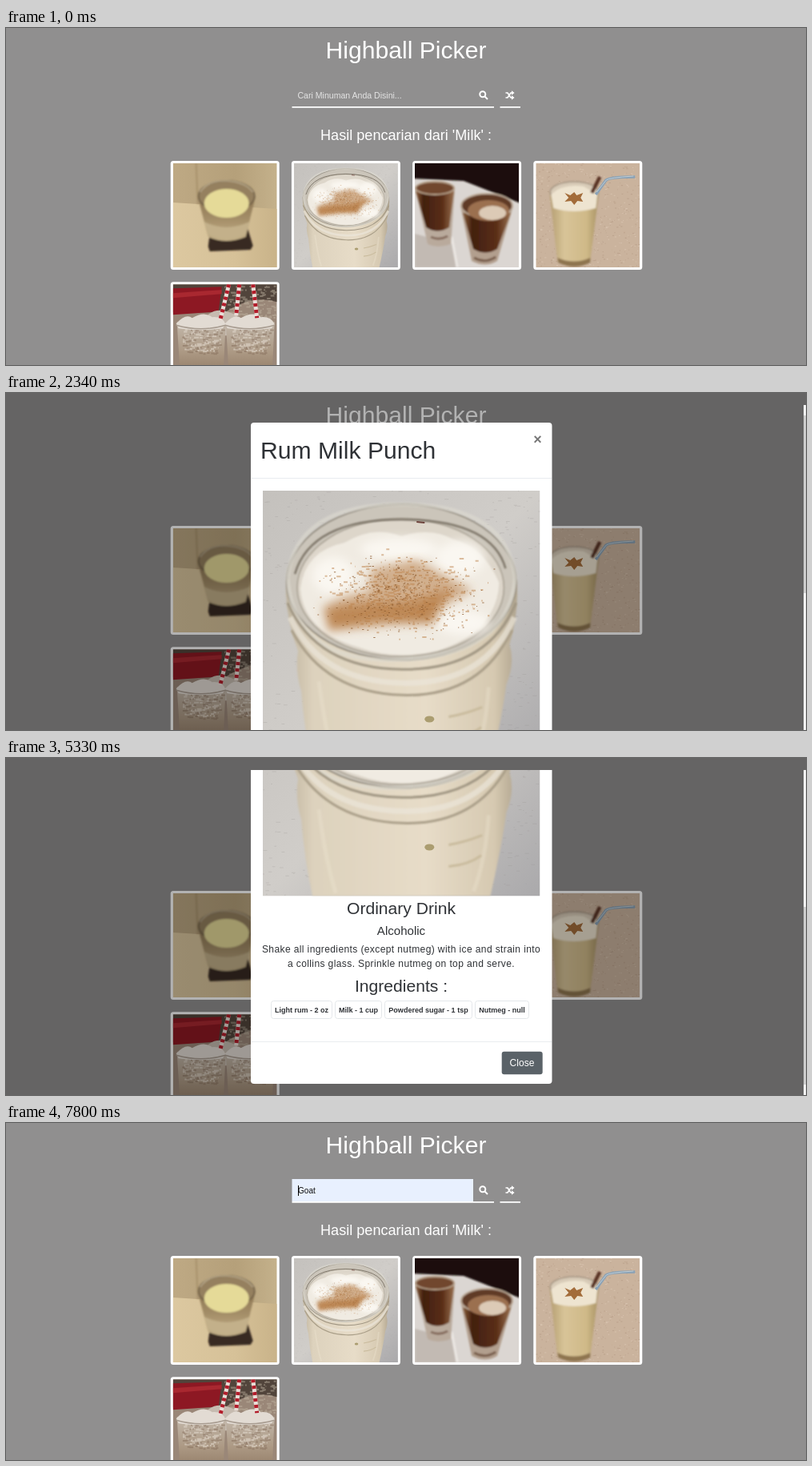
An HTML page for the animation above (8 s loop, 1000 px wide and 421 px high).

```html
<!DOCTYPE html>
<html lang="id">
<head>
<meta charset="utf-8">
<title>Highball Picker</title>
<style>
  html, body { margin: 0; width: 100%; height: 100%; overflow: hidden; background: #908f8f; }
  body > svg { display: block; width: 100%; height: 100%; }
  text { font-family: "Liberation Sans", Arial, sans-serif; fill: #2f3236; }
  .light { fill: #fff; }
  .mid { text-anchor: middle; }
  .h1 { font-size: 30.14px; }
  .h3 { font-size: 21.1px; }
  .h4 { font-size: 18.08px; }
  .h5 { font-size: 15.07px; }
  .body { font-size: 12.06px; }
  .spaced { letter-spacing: .377px; }
  .input { font-size: 10.55px; }
  .badge { font-size: 9.04px; font-weight: bold; }
</style>
</head>
<body>
<svg viewBox="0 0 1000 421">
  <defs>
    <linearGradient id="wall" x2="1"><stop stop-color="#bea984"/><stop offset=".6" stop-color="#b5a07a"/><stop offset="1" stop-color="#c4b18b"/></linearGradient>
    <linearGradient id="table" x2="1"><stop stop-color="#dcc8a0"/><stop offset=".6" stop-color="#d6c198"/><stop offset="1" stop-color="#c9b389"/></linearGradient>
    <linearGradient id="tumbler" x2="0" y2="1"><stop stop-color="#8c7552"/><stop offset=".5" stop-color="#a48e68"/><stop offset="1" stop-color="#c5b28a"/></linearGradient>
    <linearGradient id="cloth" x2="1" y2="1"><stop stop-color="#c4c1bd"/><stop offset=".5" stop-color="#d0cdc9"/><stop offset="1" stop-color="#aaa9ab"/></linearGradient>
    <linearGradient id="milk" x2="1"><stop stop-color="#bfb49f"/><stop offset=".12" stop-color="#ddd2bd"/><stop offset=".6" stop-color="#e7dcc8"/><stop offset=".9" stop-color="#d6c9b1"/><stop offset="1" stop-color="#b0a48e"/></linearGradient>
    <linearGradient id="cocoa" x2="1"><stop stop-color="#8b5f3c"/><stop offset=".2" stop-color="#42200f"/><stop offset=".7" stop-color="#5a2e18"/><stop offset="1" stop-color="#98704e"/></linearGradient>
    <linearGradient id="shake" x2="1"><stop stop-color="#b39c70"/><stop offset=".3" stop-color="#d8c498"/><stop offset=".75" stop-color="#cfb988"/><stop offset="1" stop-color="#a79163"/></linearGradient>
    <linearGradient id="frappe" x2="0" y2="1"><stop stop-color="#c3b8ab"/><stop offset=".45" stop-color="#ac9984"/><stop offset="1" stop-color="#826a54"/></linearGradient>
    <filter id="soft"><feGaussianBlur stdDeviation="1"/></filter>
    <filter id="hazy"><feGaussianBlur stdDeviation="6"/></filter>
    <clipPath id="viewport"><rect y="15" width="1000" height="406"/></clipPath>

    <symbol id="eggnog" viewBox="0 0 130 130">
      <rect width="130" height="130" fill="url(#wall)"/>
      <path d="M0 49 130 57V130H0Z" fill="url(#table)"/>
      <g filter="url(#soft)">
        <path d="M29 0 31 51" stroke="#a8926c" stroke-width="2"/>
        <path d="M47 80 92 77 100 103 97 108 46 110 44 104Z" fill="#382a20"/>
        <path d="M31 42 44 92Q66 102 91 92L103 42Z" fill="url(#tumbler)"/>
        <path d="M39 73Q66 87 96 73L91 89Q66 99 44 89Z" fill="#c3b08a"/>
        <ellipse cx="67" cy="41" rx="35" ry="19" fill="#95805f" stroke="#75644a" stroke-width="2"/>
        <ellipse cx="67" cy="50" rx="28" ry="18" fill="#e5da98"/>
        <path d="M34 36Q44 21 67 22T100 36" fill="none" stroke="#b9a98a" stroke-width="1.5"/>
      </g>
    </symbol>

    <symbol id="punch" viewBox="0 0 346 346">
      <rect width="346" height="346" fill="url(#cloth)"/>
      <path data-speckle="500 173 173 173 173" data-size="5" stroke="#96938f" opacity=".25"/>
      <g filter="url(#soft)">
        <path d="M29 112Q27 155 44 200Q40 225 48 250Q52 300 62 346H284Q298 285 304 242Q315 215 308 192Q320 150 317 112Z" fill="url(#milk)"/>
        <ellipse cx="173" cy="114" rx="143" ry="97" fill="#cbc5ba" stroke="#8f887b" stroke-width="2"/>
        <ellipse cx="172" cy="121" rx="129" ry="86" fill="#ddd6ca" stroke="#a39b8d" stroke-width="1.5"/>
        <path d="M47 122Q53 75 102 65Q137 43 173 57Q210 45 238 61Q276 71 295 115Q292 176 217 200Q164 212 119 195Q51 176 47 122Z" fill="#f0ebe2"/>
      </g>
      <g fill="#faf7f1" filter="url(#hazy)"><ellipse cx="170" cy="73" rx="48" ry="14"/><ellipse cx="246" cy="85" rx="30" ry="22"/><ellipse cx="88" cy="106" rx="26" ry="23"/><ellipse cx="250" cy="165" rx="33" ry="15"/></g>
      <g fill="#b97f48" filter="url(#hazy)">
        <path d="M74 146Q100 128 132 126L135 98 190 86 232 108 262 124 222 146 212 166 160 168 82 176Z" opacity=".55"/>
        <path d="M80 148Q130 138 180 139L236 122 212 164 148 163 84 172Z" opacity=".8"/>
      </g>
      <path data-speckle="500 175 128 125 64" data-cluster data-size="5" stroke="#bb8048" stroke-width="2" opacity=".5"/>
      <path data-speckle="400 170 133 130 66" data-cluster data-size="2" stroke="#8d5c30" opacity=".8"/>
      <g fill="none" filter="url(#soft)">
        <path d="M31 108Q42 17 173 17T315 108Q308 205 173 211T31 108" stroke="#dedad1" stroke-width="5" opacity=".6"/>
        <path d="M40 104Q60 36 173 36T303 97" stroke="#7d7568" stroke-width="2.5"/>
        <path d="M31 140Q67 222 174 223T316 140" stroke="#a09683" stroke-width="3"/>
        <path d="M34 158Q72 238 174 240T314 158" stroke="#ece6da" stroke-width="7" opacity=".7"/>
        <path d="M36 174Q77 252 174 255T311 174" stroke="#aa9f89" stroke-width="3"/>
        <path d="M70 238Q78 300 91 342M282 245Q278 302 263 340" stroke="#eee5d1" stroke-width="5" opacity=".35"/>
        <path d="M232 282q20-3 42-12M232 309q25-2 41-14" stroke="#c9bb9d" stroke-width="3"/>
      </g>
      <ellipse cx="208" cy="285" rx="6" ry="4" fill="#ab9d70"/>
      <path d="M192 39l10 1" stroke="#6b4039" stroke-width="2"/>
    </symbol>

    <symbol id="shots" viewBox="0 0 130 130">
      <rect width="130" height="130" fill="#dbd6d2"/>
      <g filter="url(#soft)">
        <path d="M-5-5H135V51L61 22-5 19Z" fill="#1b110b"/>
        <path d="M0 88 47 101 53 130H0Z" fill="#c2bab3"/>
        <path d="M46 92 53 130" stroke="#ece8e4" stroke-width="3"/>
        <path d="M0 31 16 101Q28 107 45 101L50 31Z" fill="#b9aa9c"/>
        <path d="M1 35 14 80Q28 89 43 80L49 35Z" fill="url(#cocoa)"/>
        <path d="M20 92Q30 97 41 91" stroke="#83695a" stroke-width="3" fill="none"/>
        <ellipse cx="25" cy="31" rx="24" ry="8" fill="#71472e" stroke="#b39d86" stroke-width="2"/>
        <path d="M57 53 71 122Q88 131 103 122L123 53Z" fill="#b29f8e"/>
        <path d="M60 62 73 107Q88 116 103 107L120 62Z" fill="url(#cocoa)"/>
        <path d="M74 118Q88 126 101 117" stroke="#775b49" stroke-width="3" fill="none"/>
        <ellipse cx="90" cy="53" rx="32" ry="15" fill="#613b26" stroke="#bba996" stroke-width="2"/>
        <ellipse cx="92" cy="59" rx="26" ry="13" fill="#9b7050"/>
        <ellipse cx="97" cy="62" rx="17" ry="9" fill="#dccab6"/>
      </g>
    </symbol>

    <symbol id="milkshake" viewBox="0 0 130 130">
      <rect width="130" height="130" fill="#cab39d"/>
      <path data-speckle="320 65 65 65 65" data-size="2" stroke="#a88b77" opacity=".4"/>
      <path data-speckle="250 65 65 65 65" data-size="2" stroke="#dfccb9" opacity=".6"/>
      <g filter="url(#soft)">
        <path d="M17 35 27 122Q48 134 68 122L79 35Z" fill="url(#shake)"/>
        <path d="M27 118Q48 127 68 118V124Q48 134 28 124Z" fill="#8e7550"/>
        <ellipse cx="48" cy="36" rx="30" ry="13" fill="#d8cbb7" stroke="#a39381" stroke-width="1.5"/>
        <path d="M19 39Q34 25 60 29L77 39 75 56Q47 64 22 56Z" fill="#eee4d0"/>
        <path d="M70 37 80 17" stroke="#583123" stroke-width="4.5"/>
      </g>
      <path d="M36 37l7 3 5-4 3 4 8-3-3 6 3 5-7-1-4 5-4-5-8 1 5-5Z" fill="#a36c3a"/>
      <path d="M75 39 87 22Q90 17 124 17" fill="none" stroke="#8aa2b6" stroke-width="3.5"/>
      <path d="M76 36 88 21Q91 18 122 16" fill="none" stroke="#c1ccd2"/>
    </symbol>

    <symbol id="frappes" viewBox="0 0 130 130">
      <rect width="130" height="130" fill="#9a8778"/>
      <path d="M0 0H130V22Q100 12 65 35H0Z" fill="#51443b"/>
      <path data-speckle="120 97 22 33 20" data-size="6" stroke="#c3b8a5" stroke-width="2" opacity=".45"/>
      <path d="M0 5 61 3 57 34 0 38Z" fill="#8d1823"/>
      <path d="M0 11 61 7V12L0 17Z" fill="#a92830"/>
      <path d="M43 39Q56 26 80 39V64H43Z" fill="#c6bbb0"/>
      <g id="jar">
        <path d="M5 47 10 130H62L66 47Z" fill="url(#frappe)"/>
        <path data-speckle="90 36 70 24 15" data-size="6" stroke="#e6ddd2" stroke-width="2" opacity=".55"/>
        <path data-speckle="70 36 72 25 16" data-size="5" stroke="#866f5c" stroke-width="2" opacity=".5"/>
        <path d="M4 49Q16 36 24 42Q39 33 49 41Q62 40 66 50L62 55Q34 59 7 55Z" fill="#e2dbd3"/>
        <path d="M4 51Q35 60 66 51" fill="none" stroke="#a79b8f" stroke-width="1.5"/>
      </g>
      <use href="#jar" x="61"/>
      <g fill="none" stroke="#e9ddd7" stroke-width="5"><path id="straws" d="M70 0 59 45M83 0 79 39M100 0 105 42"/></g>
      <use href="#straws" fill="none" stroke="#b21c2a" stroke-width="5" stroke-dasharray="4 4"/>
    </symbol>
  </defs>

  <rect width="1000" height="421" fill="#908f8f"/>
  <text class="h1 light mid" x="500" y="38">Highball Picker</text>
  <text class="h4 light mid" x="500" y="140">Hasil pencarian dari 'Milk' :</text>
  <text id="placeholder" class="input" x="364.5" y="87.5" style="fill:#e4e4e4">Cari Minuman Anda Disini...</text>
  <g id="autofill">
    <rect x="357.5" y="70" width="226.5" height="28" fill="#e8f0fe"/>
    <text x="365" y="87.5" font-size="10.05" style="fill:#111">Goat</text>
  </g>
  <rect id="caret" x="365" y="78" width="1" height="13"/>
  <path d="M357.5 98.8H610M617.5 98.8H643" stroke="#fff" stroke-width="1.7"/>
  <g fill="none" stroke="#fff" stroke-width="2">
    <circle cx="595.8" cy="82.8" r="3.5"/><path d="M598.5 85.5 602 89"/>
    <path d="M624.5 81H627L631 87H633M624.5 87H627L631 81H633" stroke-width="1.7"/>
  </g>
  <path d="M632 78.2 635.6 81 632 83.8ZM632 84.2 635.6 87 632 89.8Z" fill="#fff"/>
  <g id="cards"></g>

  <rect id="backdrop" width="1000" height="421"/>

  <g id="overlay" clip-path="url(#viewport)">
    <g id="modal">
      <rect x="306" y="37" width="376.5" height="666" rx="4" fill="#fff"/>
      <text class="h1" x="318" y="82">Rum Milk Punch</text>
      <text class="mid" x="664.5" y="63.5" font-size="18" font-weight="bold" style="fill:#777">×</text>
      <path d="M306.5 106.5H682M306.5 650.5H682" stroke="#e9ecef"/>
      <use href="#punch" x="321" y="122" width="346.5" height="346.5"/>
      <text class="h3 mid" x="494" y="491">Ordinary Drink</text>
      <text class="h5 mid" x="494" y="516.5">Alcoholic</text>
      <text class="body spaced mid" x="494" y="539">Shake all ingredients (except nutmeg) with ice and strain into</text>
      <text class="body spaced mid" x="494" y="557">a collins glass. Sprinkle nutmeg on top and serve.</text>
      <text class="h3 mid" x="494" y="588">Ingredients :</text>
      <g id="badges"></g>
      <rect id="close" x="619.7" y="662.7" width="51" height="28.6" rx="3"/>
      <text class="body light mid" x="645" y="681">Close</text>
    </g>
    <rect x="997" y="15" width="3" height="406" fill="#f1f1f1"/>
    <rect id="thumb" x="997" width="3" height="222" fill="#cdcdcd"/>
  </g>
</svg>
<script>
const $ = id => document.getElementById(id);

let seed = 7;
const random = () => (seed = seed * 16807 % 2147483647) / 2147483647;

// Short strokes strewn over a box, or gathered towards its middle.
document.querySelectorAll('[data-speckle]').forEach(path => {
  const [count, cx, cy, rx, ry] = path.dataset.speckle.split(' ').map(Number);
  const gathered = 'cluster' in path.dataset;
  const offset = () => gathered ? (random() + random() + random()) / 1.5 - 1 : random() * 2 - 1;
  let d = '';
  for (let i = 0; i < count; i++) {
    const x = cx + rx * offset(), y = cy + ry * offset();
    d += `M${x.toFixed(1)} ${y.toFixed(1)}h${(random() * path.dataset.size + .5).toFixed(1)}`;
  }
  path.setAttribute('d', d);
});

$('cards').innerHTML = ['eggnog', 'punch', 'shots', 'milkshake', 'frappes'].map((drink, i) => {
  const x = 205.7 + i % 4 * 151.2, y = i < 4 ? 166 : 317.2;
  return `<rect x="${x}" y="${y}" width="136" height="136" rx="3.5" fill="#fff"/>
    <use href="#${drink}" x="${x + 3}" y="${y + 3}" width="130" height="130"/>`;
}).join('');

$('badges').innerHTML = [
  ['Light rum - 2 oz', 331, 76], ['Milk - 1 cup', 411, 58],
  ['Powdered sugar - 1 tsp', 473, 109], ['Nutmeg - null', 586, 67]
].map(([label, x, width]) =>
  `<rect x="${x + .5}" y="599.5" width="${width}" height="22" rx="3" fill="#fff" stroke="#e4e7ea"/>
   <text class="badge mid" x="${x + .5 + width / 2}" y="614">${label}</text>`).join('');

const LOOP = 8000;
const timeline = {
  dim: [[0, 0], [910, .1], [1040, .22], [1170, .3], [5590, 0]],
  modal: [[0, 0], [2340, 1], [5460, .5], [5590, 0]],
  scroll: [[0, 0], [3120, 150], [3250, 296]],
  button: [[0, '#6c757d'], [5330, '#5a6268']],
  autofill: [[0, 0], [7280, 1]],
  caret: [[0, 0], [6630, 1], [7150, 0], [7800, 1]]
};
const at = (track, t) => timeline[track].findLast(([start]) => start <= t)[1];

function draw(now) {
  const t = now % LOOP;
  const scroll = at('scroll', t), filled = at('autofill', t);
  $('backdrop').setAttribute('opacity', at('dim', t));
  $('overlay').setAttribute('opacity', at('modal', t));
  $('modal').setAttribute('transform', `translate(0 ${-scroll})`);
  $('thumb').setAttribute('y', 28 + scroll / 296 * 158);
  $('close').setAttribute('fill', at('button', t));
  $('autofill').setAttribute('opacity', filled);
  $('placeholder').setAttribute('opacity', 1 - filled);
  $('caret').setAttribute('opacity', at('caret', t));
  $('caret').setAttribute('fill', filled ? '#000' : '#fff');
  requestAnimationFrame(draw);
}
draw(performance.now());
</script>
</body>
</html>
```
